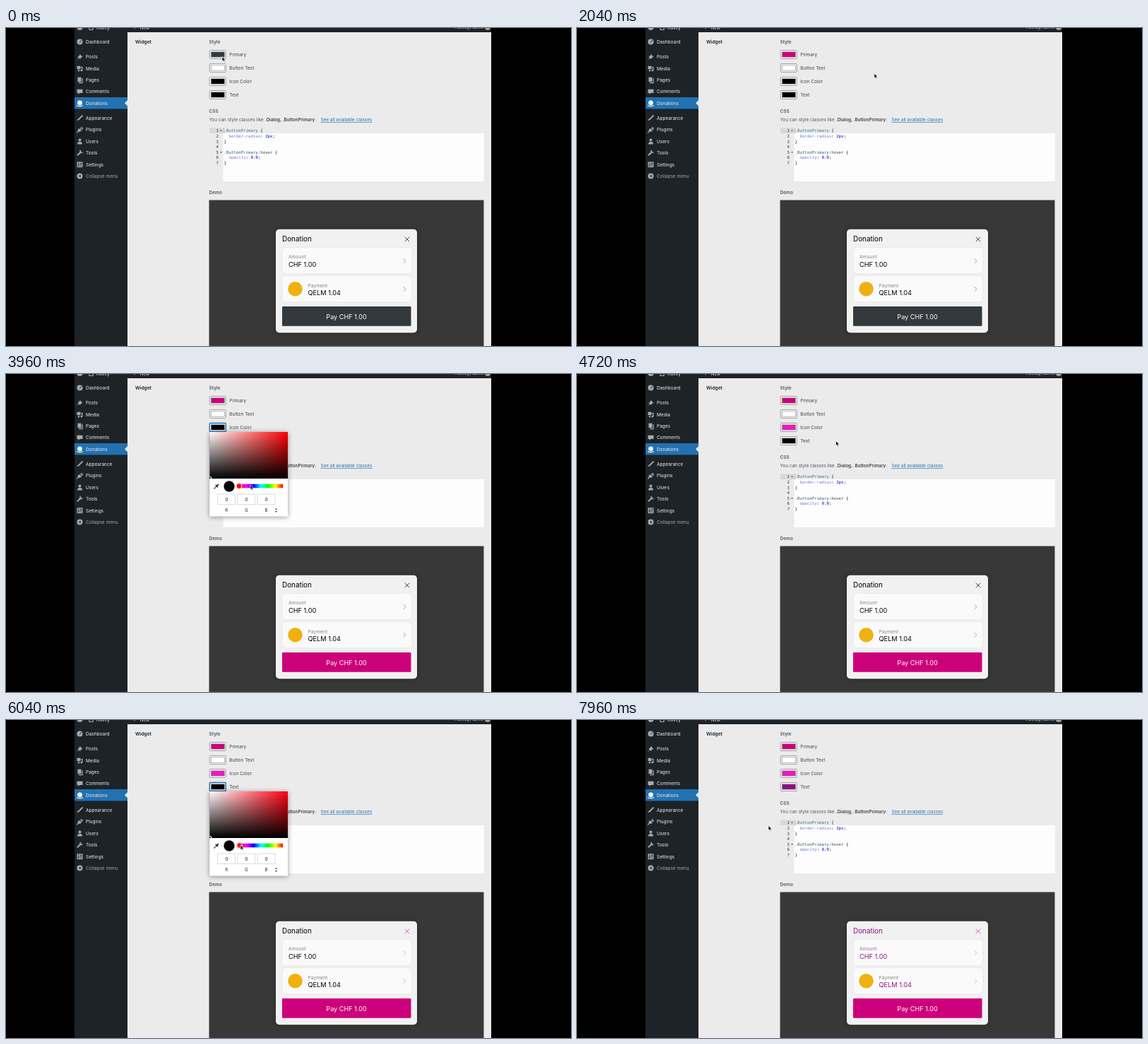
An HTML page that plays this animation: 800 px wide and 450 px high, repeating every 8000 ms.

```html
<!DOCTYPE html>
<html lang="en">
<head>
<meta charset="utf-8">
<title>Widget styling</title>
<style>
html, body { margin: 0; width: 100%; height: 100%; overflow: hidden; background: #000; }
svg { display: block; width: 100vw; height: 100vh; }
text { font-family: Inter, Roboto, sans-serif; white-space: pre; }
.code { font-family: "DejaVu Sans Mono", "Liberation Mono", monospace; font-size: 5.73px; }
</style>
</head>
<body>
<svg viewBox="0 0 800 450" preserveAspectRatio="none">
  <defs>
    <linearGradient id="white"><stop stop-color="#fff"/><stop offset="1" stop-color="#fff" stop-opacity="0"/></linearGradient>
    <linearGradient id="black" x2="0" y2="1"><stop stop-color="#000" stop-opacity="0"/><stop offset="1"/></linearGradient>
    <linearGradient id="hues"></linearGradient>
    <clipPath id="page"><rect x="97" width="590" height="450"/></clipPath>
    <filter id="soft" x="-20%" y="-20%" width="140%" height="140%"><feGaussianBlur stdDeviation="3.5"/></filter>
    <filter id="faint" x="-20%" y="-20%" width="140%" height="140%"><feGaussianBlur stdDeviation="1"/></filter>
  </defs>
  <g clip-path="url(#page)"><g id="base"></g><g id="live"></g></g>
</svg>
<script>
const LOOP = 8000;
const $ = id => document.getElementById(id);
const clamp = x => Math.max(0, Math.min(1, x));
const lerp = (a, b, k) => a + (b - a) * k;

const rect = (x, y, w, h, fill, more = '') =>
  `<rect x="${x}" y="${y}" width="${w}" height="${h}" fill="${fill}" ${more}/>`;
const circle = (x, y, r, fill, more = '') =>
  `<circle cx="${x}" cy="${y}" r="${r}" fill="${fill}" ${more}/>`;
const path = (d, more) => `<path d="${d}" ${more}/>`;
const text = (x, y, str, size, fill, more = '') =>
  `<text x="${x}" y="${y}" font-size="${size}" fill="${fill}" ${more}>${str}</text>`;
const line = (color, w) => `fill="none" stroke="${color}" stroke-width="${w}" stroke-linecap="round"`;

// Rows of [time, ...values], eased between neighbours
function track(rows, t) {
  let i = 0;
  while (i < rows.length - 1 && rows[i + 1][0] <= t) i++;
  const a = rows[i], b = rows[i + 1] || a;
  const k = b === a ? 0 : clamp((t - a[0]) / (b[0] - a[0]));
  const e = k * k * (3 - 2 * k);
  return a.slice(1).map((v, j) => lerp(v, b[j + 1], e));
}

function rgb([h, s, v]) {
  const part = n => {
    const k = (n + h / 60) % 6;
    return Math.round(255 * v * (1 - s * Math.max(0, Math.min(k, 4 - k, 1))));
  };
  return [part(5), part(3), part(1)];
}
const css = hsv => `rgb(${rgb(hsv)})`;

const pickers = [
  { row: 0, open: 450, close: 1870, hsv: [
    [0, 204, .164, .239], [700, 204, .164, .239], [900, 324, .164, .239], [1299, 324, .164, .239],
    [1300, 324, .87, .76], [1500, 324, 1, .8]] },
  { row: 2, open: 3050, close: 4600, hsv: [
    [0, 360, 0, 0], [4000, 360, 0, 0], [4150, 314, 0, 0], [4359, 314, 0, 0], [4360, 314, .89, .93]] },
  { row: 3, open: 4850, close: 7280, hsv: [
    [0, 360, 0, 0], [6000, 360, 0, 0], [6250, 308, 0, 0], [6599, 308, 0, 0],
    [6600, 308, .85, .7], [6950, 308, .895, .56]] }
];

const pointer = [
  [0, 306, 40.5], [480, 306, 40.5], [700, 357, 121], [900, 336, 121], [1100, 381, 60], [1180, 381, 60],
  [1300, 385, 60], [1500, 399, 57], [1640, 399, 57], [1860, 440, 66], [1930, 440, 66], [2400, 304, 53.5],
  [2640, 304, 53.5], [2950, 303, 74], [3150, 303, 74], [3800, 346, 157], [4000, 346, 157], [4150, 338, 158],
  [4340, 387, 87], [4400, 387, 87], [4560, 431, 96], [4620, 431, 96], [4800, 322, 94], [4870, 322, 94],
  [5070, 430.5, 94], [5450, 430.5, 94], [5950, 330, 177], [6250, 339, 177], [6590, 382, 120],
  [6950, 386, 130], [7150, 381, 138.5], [7205, 381, 138.5], [7280, 282, 147], [7500, 271, 149.5]
];

const labels = ['Primary', 'Button Text', 'Icon Color', 'Text'];
const rowY = i => 37.5 + 19 * i;

function icon(i, y) {
  const c = i === 5 ? '#fff' : '#a7aaad', s = line(c, 1.2), f = `fill="${c}"`;
  const shapes = [
    circle(0, 0, 4, c) + path('M0 1L2-2', line('#1d2327', 1)),
    path('M0-4L4 0L2 .5L.5 3L-1 1.5L-4 4L-1.8.8L-3-.5L-.5-2Z', f),
    rect(-4, -3.5, 5, 4.5, c, 'rx=".8"') + path('M3.5-2V2.5M3.5-2L2-1.5', s) + circle(2.3, 2.8, 1.4, c) + circle(-1.5, 3, 1.2, c),
    rect(-3, -4, 5, 6.5, c) + path('M-1 4H3.6V-2', s),
    path('M-4-3.3H4V2H0L-2 4V2H-4Z', f),
    circle(0, -.7, 3.4, c) + path('M-4 3.2Q0 5 4 3.2', s),
    path('M3.5-3.5L-.5.5', line(c, 2)) + path('M-4 3.5Q-3-.5-.5.5Q1 2.5-4 3.5Z', f),
    path('M-4 4L-1.5 1.5M1-1.5L2.8-3.6M2.2 0L4-2', s) + path('M-1-2L2.2 1.4Q0 4-2.4 2Q-4 0-1-2Z', f),
    circle(0, -2, 2, c) + path('M-3.5 4Q-3.5.7 0 .7T3.5 4Z', f),
    path('M-3 3L1.5-1.5', line(c, 2)) + path('M1-3.6A2 2 0 1 0 3.8-.8', s),
    rect(-4, -4, 8, 8, c, 'rx=".8"') + path('M-1.6-3V3M1.6-3V3M-2.6 1H-.6M.6-1H2.6', line('#1d2327', .8)),
    circle(0, 0, 4, c) + path('M1.2-2L-1.6 0L1.2 2Z', 'fill="#1d2327"')
  ];
  return `<g transform="translate(104.5 ${y})">${shapes[i]}</g>`;
}

function drawBase() {
  const menu = ['Dashboard', 'Posts', 'Media', 'Pages', 'Comments', 'Donations', 'Appearance', 'Plugins',
    'Users', 'Tools', 'Settings', 'Collapse menu'];
  const menuY = i => 19.5 + 16.4 * i + (i > 0 ? 5 : 0) + (i > 5 ? 5 : 0) - (i > 5 ? .3 : 0);
  let out = rect(97, 0, 75, 450, '#1d2327') + rect(172, 0, 515, 450, '#ebebeb') + rect(97, 0, 590, 6, '#1d2327');
  out += circle(104.5, -1, 4, '#a7aaad') + path('M118-2V2.5H123V-2', line('#a7aaad', 1.2));
  out += text(128, 1.6, 'Ruvey', 6.5, '#f0f0f1') + path('M180-1H184M182-3V1', line('#a7aaad', 1));
  out += text(189.5, 1.6, 'New', 6.5, '#f0f0f1') + text(635, 1.2, 'Howdy, tamiv', 6.5, '#f0f0f1');
  out += circle(682, -1, 4, '#b79a8c');
  out += rect(97, 98, 75, 16.4, '#2271b1') + path('M172 102.2L168 106.2L172 110.2Z', 'fill="#ebebeb"');
  menu.forEach((name, i) => {
    out += icon(i, menuY(i)) + text(113, menuY(i) + 2.3, name, 6.5, i === 11 ? '#a7aaad' : '#f0f0f1');
  });

  const bold = 'font-weight="600"';
  out += text(183, 22.3, 'Widget', 6.6, '#1d2327', bold);
  out += text(287.5, 22.3, 'Style', 6.5, '#50575e', bold);
  labels.forEach((name, i) => out += text(316.3, rowY(i) + 2.4, name, 6.5, '#3c434a'));
  out += text(287.5, 120.4, 'CSS', 6.5, '#50575e', bold);
  out += text(287.5, 132.4, 'You can style classes like ', 6.4, '#50575e');
  out += text(366.7, 132.4, '.Dialog, .ButtonPrimary<tspan font-weight="400">:</tspan>', 6.3, '#3c434a', bold);
  out += text(445.5, 132.4, 'See all available classes', 6.4, '#2271b1', 'text-decoration="underline"');
  out += text(287.5, 234.8, 'Demo', 6.5, '#50575e', bold);

  out += rect(307.5, 149, 369.5, 68, '#fdfdfd') + rect(288, 141.5, 19.5, 7.5, '#d8d8d8');
  const c = (str, fill) => `<tspan fill="${fill}">${str}</tspan>`;
  const code = [
    c('.ButtonPrimary', '#2f7483') + ' {',
    '  ' + c('border-radius', '#6d79de') + ': ' + c('2px', '#0000cd') + ';',
    '}', '',
    c('.ButtonPrimary', '#2c6470') + c(':hover', '#2f4a55') + ' {',
    '  ' + c('opacity', '#6d79de') + ': ' + c('0.9', '#0000cd') + ';',
    '}'
  ];
  code.forEach((row, i) => {
    const y = 147.3 + 7.6 * i;
    out += text(301, y, i + 1, 5.73, '#333', 'class="code" text-anchor="end"');
    out += text(308.6, y, row, 5.73, '#111', 'class="code"');
    if (i % 4 === 0) out += path(`M303 ${y - 2.7}h3l-1.5 1.9Z`, 'fill="#555"');
  });
  return out + path('M308.6 142V148.6', line('#999', .7));
}

// Demo frame: it reloads shortly after a picker closes
function drawDemo(t) {
  const color = (p, k) => css(track(p.hsv, k >= 0 ? LOOP : 0));
  const done = pickers.filter(p => t >= p.close);
  const age = done.length ? t - done[done.length - 1].close : LOOP;
  const look = pickers.map(p => color(p, t - p.close - 320));
  const [main, tint, ink] = look;
  const fresh = age >= 320;
  const shade = fresh ? clamp((age - 320) / 170) : 1;
  const alpha = fresh ? clamp((age - 400) / 90) : 1;
  const dy = fresh ? -14 * (1 - clamp((age - 400) / 200)) : 0;
  const ready = !fresh || age >= 620;
  let out = rect(287.5, 243.5, 389, 207, '#fff') + rect(287.5, 243.5, 389, 207, '#000', `opacity="${.78 * shade}"`);
  let box = rect(382, 285, 200, 146.5, '#000', 'rx="5" opacity=".3" filter="url(#soft)"');
  box += rect(382, 284.7, 200, 146.5, '#f1f1f1', 'rx="5"') + text(391, 302.3, 'Donation', 9.9, ink);
  box += path('M565 296L571 302M571 296L565 302', line(tint, .95) + ' opacity=".72"');
  if (ready) {
    const price = fresh && age < 670 ? '1' : '1.04';
    for (const y of [311, 351]) {
      box += rect(391.5, y, 183, 36.2, '#000', 'rx="5" opacity=".08" filter="url(#faint)"');
      box += rect(391.5, y, 183, 36.2, '#fafafa', 'rx="5"');
      box += path(`M563 ${y + 15.5}l3 3l-3 3`, line(tint, .8) + ' opacity=".45"');
    }
    box += text(400, 326.3, 'Amount', 6.7, '#858585') + text(400, 337.6, 'CHF 1.00', 9.2, ink);
    box += circle(409.5, 369.3, 10.3, '#f0b010');
    box += text(427.5, 366.5, 'Payment', 6.7, '#858585') + text(427.5, 377.6, 'QELM ' + price, 9.2, ink);
    box += rect(391, 394, 182.5, 27.7, main, 'rx="1"');
    box += text(482, 411.6, 'Pay CHF 1.00', 9.1, '#fff', 'text-anchor="middle"');
  } else {
    box += rect(391, 311, 182.5, 36.2, '#d0d3d2', 'rx="5"') + rect(391, 351, 182.5, 36.2, '#d0d3d2', 'rx="5"');
    box += rect(391, 394, 182.5, 27.7, '#d0d3d2', 'rx="1"');
  }
  return out + `<g opacity="${alpha}" transform="translate(0 ${dy})">${box}</g>`;
}

function drawSwatches(t) {
  const fills = ['', '#fff', '', ''];
  pickers.forEach(p => fills[p.row] = css(track(p.hsv, t)));
  const active = pickers.find(p => t >= p.open && t < p.close);
  return fills.map((fill, i) => {
    const on = active && active.row === i, y = rowY(i);
    return rect(288.3, y - 6, 23, 12, '#f4f4f4', `rx="1" stroke="${on ? '#2271b1' : '#8c8f94'}" stroke-width="${on ? 1.4 : .8}"`) +
      rect(290.5, y - 3.6, 18.8, 7.2, fill, 'stroke="#777" stroke-width=".5"');
  }).join('');
}

function drawPicker(p, t) {
  const x = 288.3, y = rowY(p.row) + 6.5, w = 110.7, h = 66;
  const hsv = track(p.hsv, t), [hue, s, v] = hsv, pure = css([hue, 1, 1]);
  const hueX = 330 + 62 * (1 - hue / 360);
  let out = rect(x, y + 1, w, 119.5, '#000', 'opacity=".4" filter="url(#soft)"') + rect(x, y, w, 119.5, '#fff');
  out += [pure, 'url(#white)', 'url(#black)'].map(f => rect(x, y, w, h, f)).join('');
  out += `<svg x="${x}" y="${y}" width="${w}" height="${h}">` +
    circle(s * w, (1 - v) * h, 2.6, css(hsv), 'stroke="#fff" stroke-width="1.2"') + '</svg>';
  out += `<g transform="translate(298 ${y + 77})">` + path('M-3 3L1-1', line('#222', 1.5)) +
    path('M-2.4 2.4L.6-.6', line('#fff', .6)) + path('M-.7-1.6L1.6.7M1-1L2.6-2.6', line('#222', 1.6)) + '</g>';
  out += circle(316, y + 77, 7.7, css(hsv), 'stroke="#bbb" stroke-width=".3"');
  out += rect(330, y + 73.7, 62, 5.6, 'url(#hues)');
  out += circle(hueX, y + 76.5, 3.8, pure, 'stroke="#fff" stroke-width="1.2"') +
    circle(hueX, y + 76.5, 4.6, 'none', 'stroke="#777" stroke-width=".4"');
  rgb(hsv).forEach((n, i) => {
    const cx = 312.3 + 28.1 * i, mid = 'text-anchor="middle"';
    out += rect(cx - 12.5, y + 88, 25, 14.7, '#fff', 'stroke="#c4c4c4" stroke-width=".6"');
    out += text(cx, y + 97.8, n, 6.6, '#222', mid) + text(cx, y + 113, 'RGB'[i], 6, '#222', mid);
  });
  return out + path(`M381 ${y + 110}l1.6-2l1.6 2ZM381 ${y + 112}l1.6 2l1.6-2Z`, 'fill="#444"');
}

function drawPointer(t) {
  const [x, y] = track(pointer, t);
  const hand = t > 4780 && t < 5600;
  const d = hand
    ? 'M-.6.6Q0-.8.8.6V3L3.2 3.4Q4.2 3.7 4 5L3.4 7.5H-.2L-2.3 4.6Q-2-.0-.6 3.6Z'
    : 'M0 0V6.8L1.6 5.3L2.7 7.8L3.9 7.3L2.8 4.9H5Z';
  return `<g transform="translate(${x} ${y})">` + path(d, hand
    ? 'fill="#fff" stroke="#222" stroke-width=".8" stroke-linejoin="round"'
    : 'fill="#000" stroke="#fff" stroke-width=".7"') + '</g>';
}

function render(t) {
  const active = pickers.find(p => t >= p.open && t < p.close);
  $('live').innerHTML = drawDemo(t) + drawSwatches(t) + (active ? drawPicker(active, t) : '') + drawPointer(t);
}

$('hues').innerHTML = [0, 1, 2, 3, 4, 5, 6].map(i =>
  `<stop offset="${i / 6}" stop-color="hsl(${360 - 60 * i} 100% 50%)"/>`).join('');
$('base').innerHTML = drawBase();

const start = performance.now();
function tick() {
  render((performance.now() - start) % LOOP);
  requestAnimationFrame(tick);
}
tick();
</script>
</body>
</html>
```
